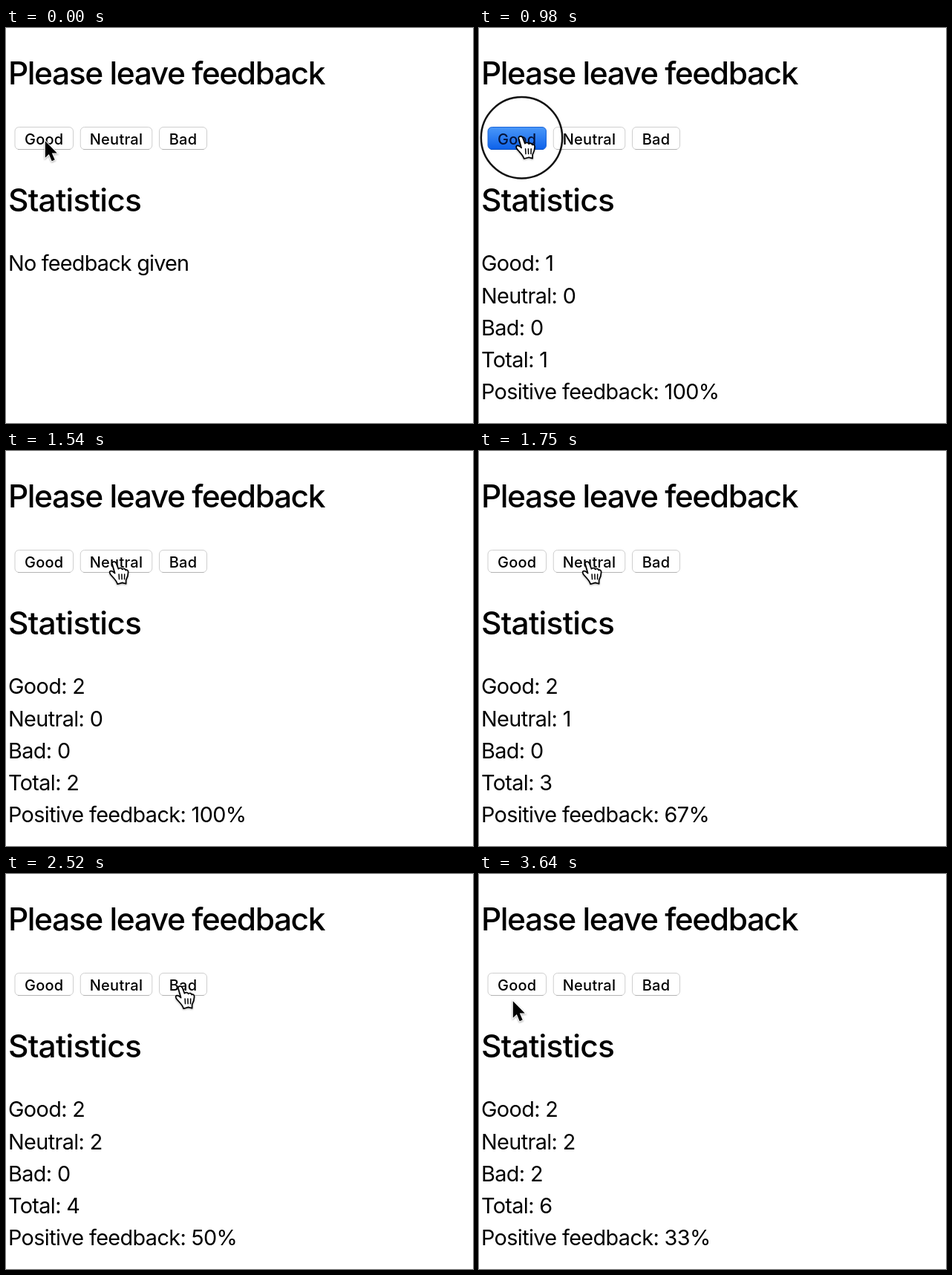
Animation, 629 px wide and 532 px high, one loop 3.71 s. Source, as an HTML page:

```html
<!DOCTYPE html>
<html lang="en">
<head>
<meta charset="utf-8">
<title>Feedback</title>
<style>
  html, body { margin: 0; width: 100%; height: 100%; overflow: hidden; background: #fff; }
  svg { display: block; width: 629px; height: 532px; font-family: Inter, "Open Sans", sans-serif; font-optical-sizing: none; }
  .title, .heading { font-size: 42.5px; font-weight: 500; letter-spacing: -1.45px; }
  .heading { letter-spacing: -.78px; }
  .line, .empty { font-size: 28.8px; letter-spacing: -.62px; }
  .empty { letter-spacing: -.78px; }
  .label { font-size: 20px; font-weight: 500; letter-spacing: .25px; text-anchor: middle; }
  .face { fill: #fff; stroke: #cfcfcf; }
  .edge { fill: none; stroke: #b4b4b4; }
  .pressed .face { fill: url(#blue); stroke: #1d66d8; }
  .pressed .edge { stroke: #0b50c0; }
  .pressed .label { fill: #04133a; }
  .cursor { filter: drop-shadow(0 1.5px 1.2px rgba(0, 0, 0, .35)); }
</style>
</head>
<body>
<svg viewBox="0 0 629 532">
  <defs>
    <linearGradient id="blue" x2="0" y2="1">
      <stop stop-color="#4a98f9"/>
      <stop offset="1" stop-color="#0d61ea"/>
    </linearGradient>
  </defs>
  <text class="title" x="3" y="76">Please leave feedback</text>
  <g id="buttons"></g>
  <text class="heading" x="3" y="247">Statistics</text>
  <text class="empty" id="empty" x="3" y="327.3">No feedback given</text>
  <g id="stats"></g>
  <circle id="ring" r="54.7" fill="none" stroke="#111" stroke-width="2.5"/>
  <g id="arrow" class="cursor">
    <path transform="translate(.8 1.8) scale(.95)" d="M0 0V23.5L5.3 18.5L9.4 28.3L13.6 26.5L9.5 17H16.8Z" stroke="#fff" stroke-width="2.2" paint-order="stroke"/>
  </g>
  <g id="hand" class="cursor" fill="#fff" stroke="#000" stroke-width="1.7" stroke-linejoin="round" stroke-linecap="round">
    <g transform="translate(-1.2 -.6)">
      <path d="M-2.8 1.5C-3.4-1.8 1.6-2.6 2.8 1L5.6 8.4C7 6.6 10 6.8 10.8 9C12.4 7.4 15 8 15.4 10.2C17.2 9.2 18.8 10.4 18.8 12.8C18.8 17 17.6 20 15.8 23.4V28.4L10.8 27L4.4 28.8C3 24-.6 21-3.6 17.6C-8.4 12.4-5.4 9.8-2 12L.8 14.2Z"/>
      <path d="M6.3 15.6L6.7 22.4M10.1 15.6L10.3 22.4M13.9 15.6L13.7 22.4" fill="none" stroke-width="1.5"/>
    </g>
  </g>
</svg>
<script>
const LOOP = 3710, STEP = 70;
const LEFT = 12, TOP = 133.5, HEIGHT = 30, GAP = 9.75;
const FIRST_PRESS = 700, PRESS_INTERVAL = 980;

// hold: length of the first press; repeat: delay until the second
const BUTTONS = [
  { label: 'Good', width: 78.5, hold: STEP, repeat: 280 },
  { label: 'Neutral', width: 96.5, hold: STEP, repeat: 280 },
  { label: 'Bad', width: 64, hold: 2 * STEP, repeat: 420 },
];

// eased pointer moves; sag bends the path downwards
const ENTRY = { x: 52, y: 150.5 };
const MOVES = [
  { start: 140, duration: 280, x: 57.5, y: 147.8, sag: 0 },
  { start: 1120, duration: 420, x: 147, y: 151, sag: 3 },
  { start: 2170, duration: 350, x: 236, y: 153, sag: 1 },
  { start: 3150, duration: 490, x: 45, y: 169.5, sag: 22 },
];

const $ = id => document.getElementById(id);
const show = (node, on) => node.setAttribute('visibility', on ? 'visible' : 'hidden');
const smooth = u => u * u * (3 - 2 * u);

function add(parent, tag, attributes, text = '') {
  const node = document.createElementNS('http://www.w3.org/2000/svg', tag);
  for (const [key, value] of Object.entries(attributes)) node.setAttribute(key, value);
  node.textContent = text;
  return parent.appendChild(node);
}

let nextX = LEFT;
BUTTONS.forEach((button, i) => {
  const { label, width, hold, repeat } = button;
  const x = button.x = nextX;
  nextX += width + GAP;

  const press = FIRST_PRESS + PRESS_INTERVAL * i;
  button.clicks = [
    { press, release: press + hold },
    { press: press + repeat, release: press + repeat + STEP },
  ];

  button.node = add($('buttons'), 'g', {});
  add(button.node, 'rect', { class: 'face', x, y: TOP, width, height: HEIGHT, rx: 5.5 });
  add(button.node, 'path', { class: 'edge', d: `M${x + 4} ${TOP + HEIGHT}h${width - 8}` });
  add(button.node, 'text', { class: 'label', x: x + width / 2, y: 156.5 }, label);
});

const lines = Array.from({ length: BUTTONS.length + 2 }, (_, i) =>
  add($('stats'), 'text', { class: 'line', x: 3, y: 327.3 + 43.2 * i }));

function pointerAt(time) {
  let { x, y } = ENTRY;
  for (const move of MOVES) {
    if (time <= move.start) break;
    const p = smooth(Math.min(1, (time - move.start) / move.duration));
    x += (move.x - x) * p;
    y += (move.y - y) * p + move.sag * Math.sin(Math.PI * p);
  }
  return { x, y };
}

const isOverButton = ({ x, y }) => y >= TOP && y <= TOP + HEIGHT &&
  BUTTONS.some(b => x >= b.x && x <= b.x + b.width);

function renderStats(time) {
  const counts = BUTTONS.map(b => b.clicks.filter(c => time >= c.release).length);
  const total = counts.reduce((sum, n) => sum + n, 0);
  const texts = [
    ...BUTTONS.map(({ label }, i) => `${label}: ${counts[i]}`),
    `Total: ${total}`,
    `Positive feedback: ${Math.round(100 * counts[0] / total)}%`,
  ];
  lines.forEach((line, i) => { line.textContent = texts[i]; });
  show($('empty'), !total);
  show($('stats'), total);
}

function render(time) {
  const pointer = pointerAt(time);
  const hand = time > MOVES[0].start && isOverButton(pointer);
  const place = `translate(${pointer.x} ${pointer.y})`;
  for (const id of ['arrow', 'hand', 'ring']) $(id).setAttribute('transform', place);
  show($('hand'), hand);
  show($('arrow'), !hand);

  const isPressed = b => b.clicks.some(c => time >= c.press && time < c.release);
  show($('ring'), BUTTONS.some(isPressed));
  for (const button of BUTTONS) button.node.classList.toggle('pressed', isPressed(button));
  renderStats(time);
}

function tick(now) {
  render(Math.floor(now % LOOP / STEP) * STEP);
  requestAnimationFrame(tick);
}

render(0);
requestAnimationFrame(tick);
</script>
</body>
</html>
```
